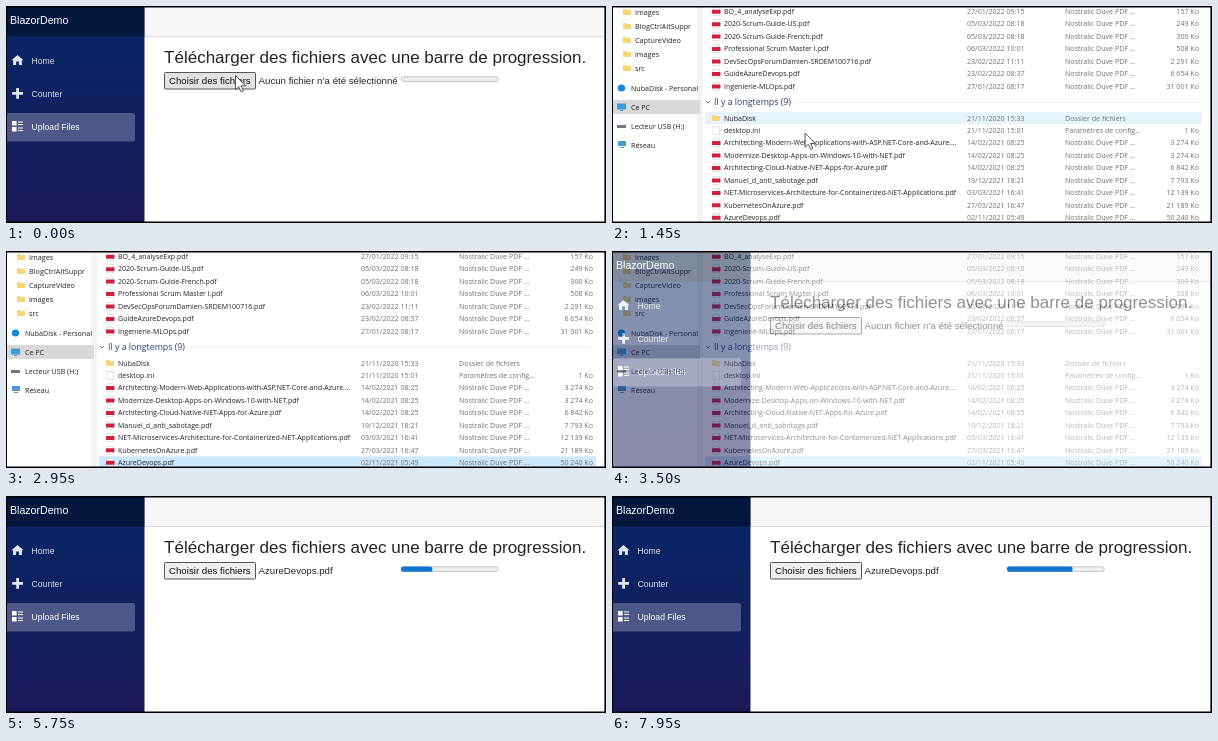
Animation, 600 px wide and 217 px high, one loop 8 s. Source, as an HTML page:

```html
<!DOCTYPE html>
<html lang="fr">
<head>
<meta charset="utf-8">
<title>BlazorDemo</title>
<style>
  html, body { margin: 0; width: 100%; height: 100%; overflow: hidden; background: #fff; }
  svg { display: block; width: 100%; height: 100%; }
  #page { font-family: "Liberation Sans", Arial, sans-serif; }
  #explorer { font-family: "Open Sans", "Noto Sans", sans-serif; }
  text { white-space: pre; }
</style>
</head>
<body>
<svg id="stage" viewBox="0 0 600 217">
  <defs>
    <linearGradient id="navy" gradientUnits="userSpaceOnUse" x1="0" y1="0" x2="0" y2="500">
      <stop offset="0" stop-color="#052767"/><stop offset="1" stop-color="#3a0647"/>
    </linearGradient>
  </defs>
  <g id="explorer"></g>
  <g id="page"></g>
  <path id="cursor" d="M0 0V14.2L3.3 11.2 5.6 16.4 7.9 15.4 5.6 10.3H10.2Z" fill="#fff" stroke="#333" stroke-width=".8"/>
  <path d="M0 0H600V217H0ZM1 1.6V215.6H598.4V1.6Z" fill="#000" fill-rule="evenodd"/>
</svg>
<script>
const LOOP = 8000;
const byId = id => document.getElementById(id);
const explorer = byId('explorer'), page = byId('page'), cursor = byId('cursor');

function add(parent, tag, attrs) {
  const el = document.createElementNS('http://www.w3.org/2000/svg', tag);
  for (const key in attrs) el.setAttribute(key, attrs[key]);
  return parent.appendChild(el);
}
const rect = (parent, x, y, width, height, fill, more) =>
  add(parent, 'rect', { x, y, width, height, fill, ...more });
const path = (parent, d, fill, more) => add(parent, 'path', { d, fill, ...more });
function label(parent, x, y, string, size, fill, anchor = 'start') {
  const el = add(parent, 'text', { x, y, fill, 'font-size': size, 'text-anchor': anchor });
  el.textContent = string;
  return el;
}

// File explorer
const ROW = 12.45;
const PDF = 'Nostralic Duve PDF ...';
const recent = [
  ['BO_4_analyseExp.pdf', '27/01/2022 09:15', '157 Ko'],
  ['2020-Scrum-Guide-US.pdf', '05/03/2022 08:18', '249 Ko'],
  ['2020-Scrum-Guide-French.pdf', '05/03/2022 08:18', '300 Ko'],
  ['Professional Scrum Master I.pdf', '06/03/2022 10:01', '508 Ko'],
  ['DevSecOpsForumDamien-SRDEM100716.pdf', '23/02/2022 11:11', '2 291 Ko'],
  ['GuideAzureDevops.pdf', '23/02/2022 08:37', '6 654 Ko'],
  ['Ingenierie-MLOps.pdf', '27/01/2022 08:17', '31 001 Ko']
];
const older = [
  ['NubaDisk', '21/11/2020 15:33', '', 'Dossier de fichiers'],
  ['desktop.ini', '21/11/2020 15:01', '1 Ko', 'Paramètres de config...'],
  ['Architecting-Modern-Web-Applications-with-ASP.NET-Core-and-Azure....', '14/02/2021 08:25', '3 274 Ko'],
  ['Modernize-Desktop-Apps-on-Windows-10-with-NET.pdf', '14/02/2021 08:25', '3 274 Ko'],
  ['Architecting-Cloud-Native-NET-Apps-for-Azure.pdf', '14/02/2021 08:25', '6 842 Ko'],
  ['Manuel_d_anti_sabotage.pdf', '19/12/2021 18:21', '7 793 Ko'],
  ['NET-Microservices-Architecture-for-Containerized-NET-Applications.pdf', '03/03/2021 16:41', '12 139 Ko'],
  ['KubernetesOnAzure.pdf', '27/03/2021 16:47', '21 189 Ko'],
  ['AzureDevops.pdf', '02/11/2021 05:49', '50 240 Ko']
];
const rows = [];

function folder(x, y) {
  path(explorer, `M${x} ${y - 3}h3l1 1h4v5h-8z`, '#f7d675');
}
function fileRow([name, date, size, kind = PDF], y) {
  const back = rect(explorer, 93, y - ROW / 2, 497, ROW, 'none');
  rows.push({ y, back });
  if (!size) folder(100, y);
  else {
    rect(explorer, 101, y - 4, 6.5, 8, '#fff', { stroke: '#c4c4c4', 'stroke-width': .5 });
    if (kind === PDF) rect(explorer, 100, y - 1.8, 8.5, 4, '#cf2039', { rx: .6 });
  }
  label(explorer, 112, y + 2.5, name, 7.05, '#222');
  label(explorer, 355, y + 2.5, date, 7.1, '#707070');
  label(explorer, 453, y + 2.5, kind, 7.1, '#707070');
  label(explorer, 587, y + 2.5, size, 7.1, '#707070', 'end');
}
function buildExplorer() {
  rect(explorer, 0, 0, 600, 217, '#fff');
  rect(explorer, 85, 0, 6, 217, '#f3f3f3');
  rect(explorer, 0, 94, 88, 14, '#d9d9d9');
  ['Images', 'BlogCtrlAltSuppr', 'CaptureVideo', 'images', 'src'].forEach((name, i) => {
    folder(11, 6 + i * 14);
    label(explorer, 23, 8.7 + i * 14, name, 7.25, '#222');
  });
  [['NubaDisk - Personal', 82], ['Ce PC', 101], ['Lecteur USB (H:)', 120], ['Réseau', 139]]
    .forEach(([name, y]) => label(explorer, 19, y + 2.6, name, 7.1, '#222'));
  add(explorer, 'circle', { cx: 9.5, cy: 82, r: 3.6, fill: '#1687d9' });
  path(explorer, 'M5 97.5h9v6h-9zM8 104h3v1h-3z', '#3a9bd6');
  path(explorer, 'M5 119h9v3h-9z', '#777');
  path(explorer, 'M6 135h8v5h-8zM8 141h4v1h-4z', '#4a9ad0');
  recent.forEach((file, i) => fileRow(file, 5.5 + i * ROW));
  path(explorer, 'M94 95l2 2 2-2', 'none', { stroke: '#555', 'stroke-width': .8 });
  label(explorer, 102, 99.4, 'Il y a longtemps (9)', 8.8, '#263c80');
  rect(explorer, 183, 96.2, 404, .6, '#e4e4e4');
  older.forEach((file, i) => fileRow(file, 112 + i * ROW));
}

// Upload page
let button, fileName, bar;
function buildPage() {
  rect(page, 0, 0, 600, 217, '#fff');
  rect(page, 138, 0, 462, 30, '#f7f7f7');
  rect(page, 138, 30, 462, .8, '#d2d1d3');
  rect(page, 0, 0, 138.5, 217, 'url(#navy)');
  rect(page, 0, 0, 138.5, 30.5, '#000', { opacity: .4 });
  rect(page, 0, 107, 129, 28.5, '#fff', { opacity: .25, rx: 2.3 });
  label(page, 4, 18, 'BlazorDemo', 10.6, '#fff');
  label(page, 25.6, 58, 'Home', 8.65, '#d9dbe4');
  label(page, 25.6, 91, 'Counter', 8.65, '#d9dbe4');
  label(page, 25.6, 124, 'Upload Files', 8.65, '#fff');
  path(page, 'M11.5 49l6 5.3h-1.6v4.7h-3v-3.4h-2.8v3.4h-3v-4.7h-1.6z', '#e4e6ee');
  path(page, 'M10.2 82h2.8v4h4v2.8h-4v4h-2.8v-4h-4v-2.8h4z', '#e4e6ee');
  path(page, 'M6 115h4.6v4.4H6zM6 121h4.6v4.4H6zM12 115.4h5v1.1h-5zM12 118h5v1.1h-5zM12 121.4h5v1.1h-5zM12 124h5v1.1h-5z', '#fff');
  label(page, 158, 57, 'Télécharger des fichiers avec une barre de progression.', 17.05, '#212529');
  button = rect(page, 158.5, 66.5, 91, 16.5, '#efefef', { stroke: '#555', 'stroke-width': 1, rx: .8 });
  label(page, 163, 78, 'Choisir des fichiers', 9.68, '#111');
  fileName = label(page, 252.6, 78, '', 9.66, '#212529');
  rect(page, 395.3, 70.8, 97, 4.6, '#efefef', { stroke: '#b0b0b0', 'stroke-width': .7, rx: 2.3 });
  bar = rect(page, 395, 70.5, 0, 5.2, '#0f77d2', { rx: 2 });
}

// Interpolates between [time, ...values] keys
function track(keys, t) {
  const next = keys.findIndex(key => key[0] > t);
  if (next < 0) return keys[keys.length - 1].slice(1);
  if (next === 0) return keys[0].slice(1);
  const from = keys[next - 1], to = keys[next];
  const k = (t - from[0]) / (to[0] - from[0]);
  return from.slice(1).map((v, i) => v + (to[i + 1] - v) * k);
}
const pointerKeys = [[0, 229.5, 69.5], [1000, 229, 69], [1450, 193, 127], [2100, 228, 206], [2600, 236, 219]];
const fadeKeys = [[700, 1], [1100, 0], [3300, 0], [3700, 1]];

function draw(t) {
  const [x, y] = track(pointerKeys, t);
  cursor.setAttribute('transform', `translate(${x} ${y})`);
  cursor.setAttribute('visibility', t < 2650 ? 'visible' : 'hidden');
  page.setAttribute('opacity', track(fadeKeys, t)[0]);

  const selected = t >= 2600;
  rows.forEach((row, i) => {
    const active = selected ? i === rows.length - 1 : Math.abs(y - 12 - row.y) < ROW / 2;
    row.back.setAttribute('fill', active ? (selected ? '#cce8ff' : '#e5f3fc') : 'none');
  });

  button.setAttribute('fill', t < 2000 ? '#e3e3e3' : '#efefef');
  fileName.textContent = t < 3750 ? 'Aucun fichier n’a été sélectionné' : 'AzureDevops.pdf';
  bar.setAttribute('width', t < 3750 ? 0 : 1 + (t - 3800) * .01555);
}

buildExplorer();
buildPage();
function tick() {
  draw(performance.now() % LOOP);
  requestAnimationFrame(tick);
}
tick();
</script>
</body>
</html>
```
